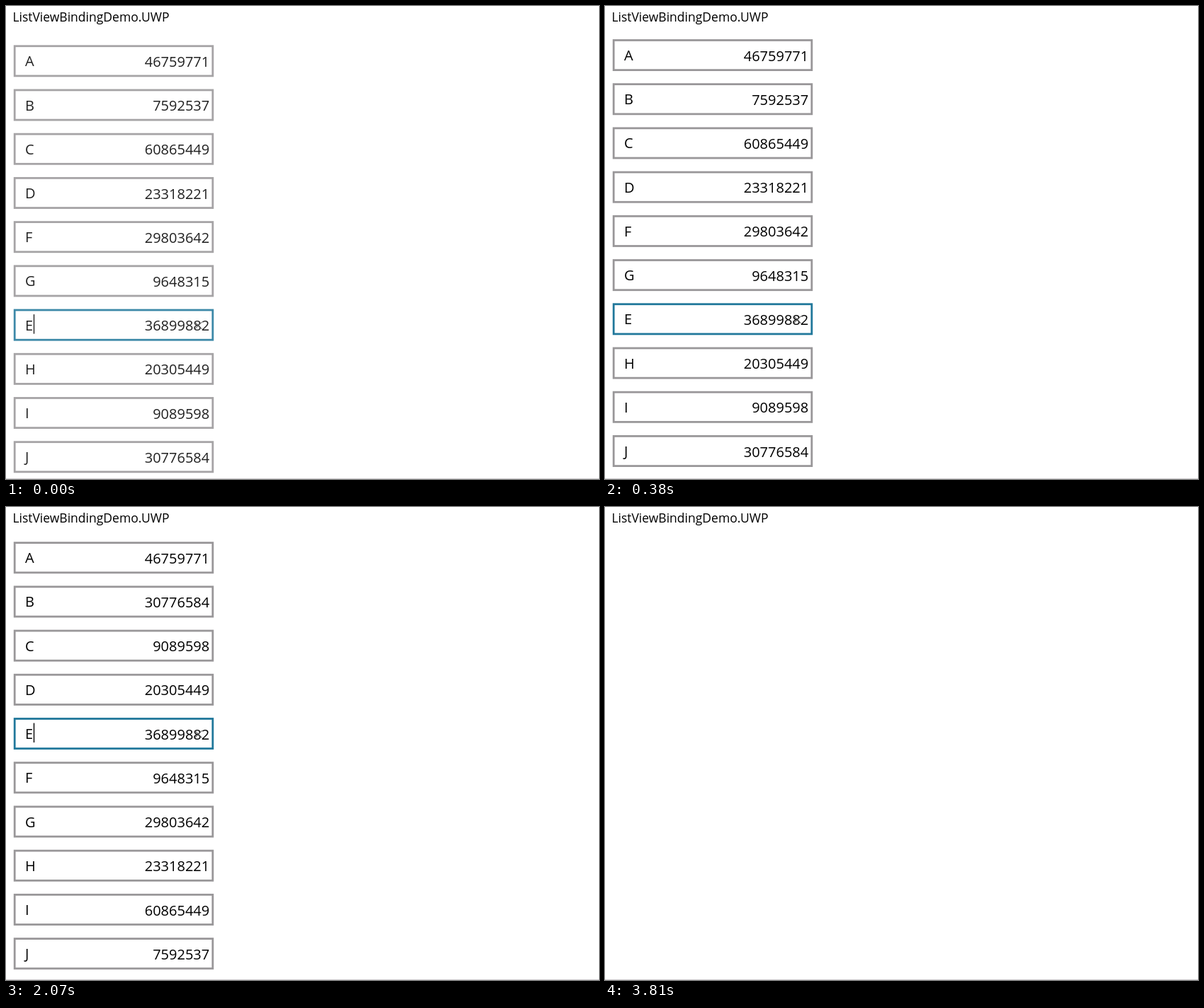
Recreate the animation shown at these times as an HTML page with a canvas. Size 837 by 669 pixels, loop 3.88 s.

```html
<!DOCTYPE html>
<html lang="en">
<head>
<meta charset="utf-8">
<title>List binding demo</title>
<style>
  html, body { margin: 0; height: 100%; overflow: hidden; background: #fff; }
  canvas { display: block; }
</style>
</head>
<body>
<canvas id="stage" width="837" height="669"></canvas>
<script>
const ctx = document.getElementById('stage').getContext('2d');
const LOOP = 3880, TOP = 47, PITCH = 62.22;
const FONT = '"Open Sans", "Noto Sans", sans-serif';

const values = [46759771, 7592537, 60865449, 23318221, 29803642,
                9648315, 36899882, 20305449, 9089598, 30776584];
const before = { names: 'ABCDFGEHIJ', values };
const after = { names: 'ABCDEFGHIJ', values: [values[0], ...values.slice(1).reverse()] };

// Each step holds until the next: time, list, downward shift, opacity
const steps = [
  [0, before, 8.3, 0.87],
  [70, before, 3.2, 1],
  [150, before, 1.6, 1],
  [230, before, 0.8, 1],
  [300, before, 0.4, 1],
  [380, before, 0, 1],
  [1920, after, 16.2, 0.07],
  [1990, after, 5.6, 0.97],
  [2070, after, 2.2, 1],
  [2150, after, 1.3, 1],
  [2220, after, 0.8, 1],
  [2300, after, 0.4, 1],
  [2370, after, 0, 1],
  [3810, null, 0, 0]
];

function text(str, x, y, size, align = 'left') {
  ctx.font = `${size}px ${FONT}`;
  ctx.textAlign = align;
  ctx.fillStyle = '#000';
  ctx.fillText(str, x, y);
}

function clearIcon(x, y, r) {
  ctx.beginPath();
  ctx.moveTo(x - r, y - r);
  ctx.lineTo(x + r, y + r);
  ctx.moveTo(x + r, y - r);
  ctx.lineTo(x - r, y + r);
  ctx.lineWidth = 1.1;
  ctx.strokeStyle = '#555';
  ctx.stroke();
}

function row(name, value, y, caretOn) {
  const focused = name === 'E';
  ctx.lineWidth = 2.8;
  ctx.strokeStyle = focused ? '#21789b' : '#999799';
  ctx.strokeRect(12.2, y + 1.4, 279.6, 42.2);
  text(name, 27, y + 30, 20);
  text(value, 287.2, y + 30.6, 20, 'right');
  if (focused) {
    clearIcon(271.5, y + 23.2, 5);
    if (caretOn) ctx.fillRect(38.8, y + 7.5, 1.4, 27.5);
  }
}

function draw(t) {
  const [, list, shift, alpha] = steps.findLast(step => step[0] <= t);
  const caretOn = t < 230 || t >= 760;
  ctx.globalAlpha = 1;
  ctx.fillStyle = '#fff';
  ctx.fillRect(0, 0, 837, 669);
  text('ListViewBindingDemo.UWP', 9.4, 22, 17.5);
  ctx.fillStyle = '#d0cdd0';
  ctx.fillRect(0, 668, 837, 1);
  if (!list) return;
  ctx.globalAlpha = alpha;
  list.values.forEach((value, i) =>
    row(list.names[i], value, TOP + i * PITCH + shift, caretOn));
}

const start = performance.now();
function tick() {
  draw((performance.now() - start) % LOOP);
  requestAnimationFrame(tick);
}
tick();
</script>
</body>
</html>
```
